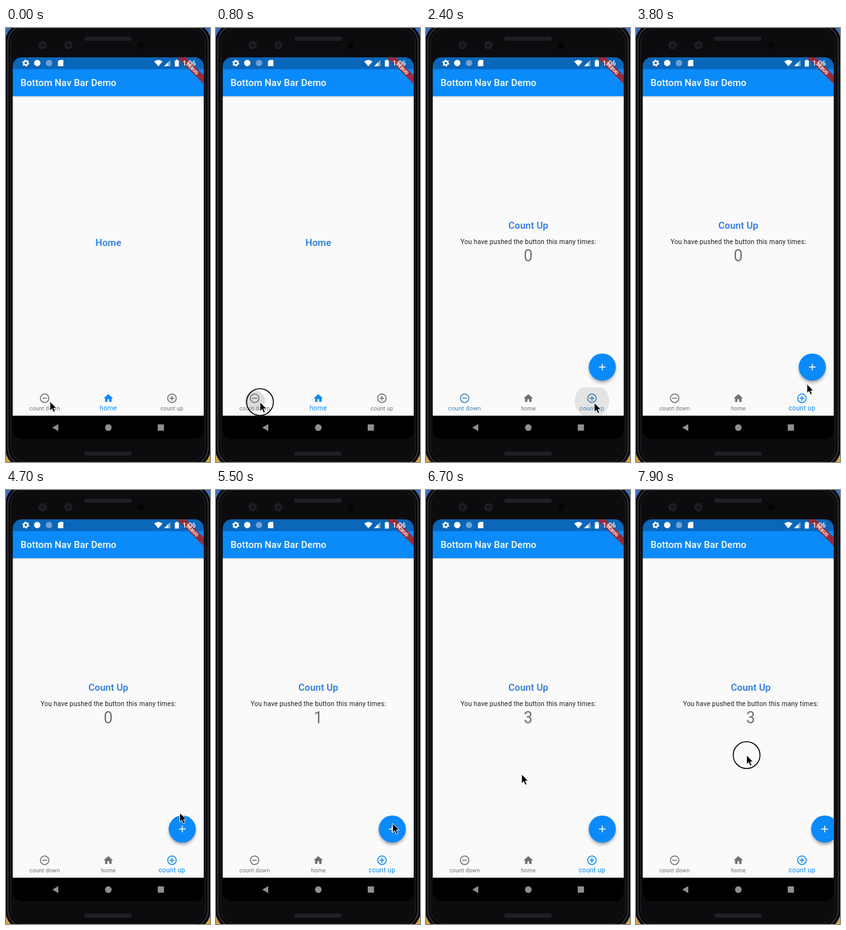
These frames come from a looping animation (320 px wide and 681 px high, 8 s). An HTML page:

```html
<!DOCTYPE html>
<html lang="en">
<head>
<meta charset="utf-8">
<title>Bottom Nav Bar Demo</title>
<style>
  html, body { margin: 0; width: 100%; height: 100%; overflow: hidden; background: #0c0c0f; }
  svg { display: block; width: 100vw; height: 100vh; }
  text { font-family: Roboto, sans-serif; }
  .mid { text-anchor: middle; }
  .head { font-size: 15px; font-weight: 500; letter-spacing: .08px; }
  .blue { fill: #2475e4; }
  .label { font-size: 10.25px; letter-spacing: .23px; }
</style>
</head>
<body>
<svg viewBox="0 0 320 681" preserveAspectRatio="none">
  <defs>
    <linearGradient id="desk" x2="0" y2="1">
      <stop offset="0" stop-color="#3a6ebc"/>
      <stop offset=".5" stop-color="#2b3440"/>
      <stop offset="1" stop-color="#d8a43c"/>
    </linearGradient>
    <linearGradient id="edge" x2="0" y2="1">
      <stop offset="0" stop-color="#000" stop-opacity=".16"/>
      <stop offset="1" stop-color="#000" stop-opacity="0"/>
    </linearGradient>
    <filter id="soft" x="-50%" y="-50%" width="200%" height="200%"><feGaussianBlur stdDeviation="2.6"/></filter>
    <clipPath id="screen"><rect x="10.600" y="46" width="299.600" height="599" rx="14"/></clipPath>
    <clipPath id="view"><rect x="10" y="107" width="301" height="501.400"/></clipPath>
    <clipPath id="bar"><rect x="10" y="564" width="301" height="44.400"/></clipPath>
    <clipPath id="fabClip"><circle cx="276.500" cy="532" r="21.300"/></clipPath>
  </defs>

  <!-- phone -->
  <rect width="320" height="681" fill="url(#desk)"/>
  <rect x="-1" y="-8" width="322" height="698" rx="30" fill="#08080a"/>
  <rect x="3" y="-4" width="314" height="690" rx="27" fill="none" stroke="#44454b" stroke-width="1.300"/>
  <rect x="7" y="0" width="306" height="681" rx="24" fill="#0c0c0f" stroke="#232429"/>
  <g fill="#1f1f25">
    <rect x="123" y="13.500" width="74" height="6.500" rx="2"/>
    <rect x="123" y="664.500" width="74" height="6.500" rx="2"/>
    <circle cx="57.500" cy="27" r="6.500"/>
    <circle cx="98" cy="27" r="6.500"/>
  </g>
  <g fill="#121319">
    <circle cx="57.500" cy="27" r="3"/>
    <circle cx="98" cy="27" r="3"/>
  </g>
  <circle cx="212" cy="27" r="5.500" fill="#050507"/>

  <g clip-path="url(#screen)">
    <rect x="10" y="46" width="301" height="599" fill="#000"/>
    <rect x="10" y="107" width="301" height="501.400" fill="#fafafa"/>
    <rect x="10" y="107" width="301" height="2.500" fill="url(#edge)"/>
    <rect x="10" y="64" width="301" height="43" fill="#0b8afa"/>
    <rect x="10" y="46" width="301" height="18.500" fill="#0a66b8"/>
    <text class="head" x="22.700" y="91.300" fill="#fff">Bottom Nav Bar Demo</text>

    <!-- status bar -->
    <g fill="#fff">
      <circle cx="31" cy="55" r="3.100" fill="none" stroke="#fff" stroke-width="2.400"/>
      <circle cx="31" cy="55" r="4.700" fill="none" stroke="#fff" stroke-width="1.600" stroke-dasharray="2.4 2.52"/>
      <circle cx="49" cy="55" r="5"/>
      <circle cx="67.500" cy="55" r="5" fill="#6ea2d6"/>
      <path d="M84 50H90V60H81.500V52.500z"/>
      <path d="M232.500 52.500Q239 47.500 245.500 52.500L239 60.300z"/>
      <path d="M248 60L258 50V60z" fill-opacity=".45"/>
      <path d="M248 60L254.500 53.500V60z"/>
      <path d="M264.800 51H266.700V49.800H269.300V51H271.200V60.500H264.800z"/>
    </g>
    <g transform="translate(310 46) rotate(45)">
      <rect x="-32" y="20" width="64" height="9.600" fill="#962c38"/>
      <text class="mid" y="27.500" font-size="7.400" font-weight="900" fill="#fff" fill-opacity=".9">DEBUG</text>
    </g>
    <text x="277" y="59" font-size="10.500" font-weight="500" fill="#fff">1:06</text>

    <!-- pages -->
    <g clip-path="url(#view)">
      <text id="home" class="mid head blue" x="160.500" y="342.300">Home</text>
      <g id="counter">
        <text id="title" class="mid head blue" x="160.500" y="315"></text>
        <text class="mid" x="160.500" y="339.300" font-size="10.300" letter-spacing=".18" fill="#202020">You have pushed the button this many times:</text>
        <text id="count" class="mid" x="160.200" y="366" font-size="25" fill="#717171"></text>
        <circle cx="276.500" cy="535.500" r="20.500" fill="#000" fill-opacity=".38" filter="url(#soft)"/>
        <circle cx="276.500" cy="532" r="21.300" fill="#0b8afa"/>
        <g clip-path="url(#fabClip)"><circle id="fabInk" cx="277" cy="525" fill="#fff"/></g>
        <path id="sign" stroke="#fff" stroke-width="1.500"/>
      </g>
    </g>

    <!-- bottom bar -->
    <g clip-path="url(#bar)"><circle id="ink" cy="585" fill="#000"/></g>
    <g id="nav"></g>
    <g fill="#8f8f8f">
      <path d="M82 621.500V632.500L72.500 627z"/>
      <circle cx="160.500" cy="627" r="5.200"/>
      <rect x="238" y="622" width="9.800" height="9.800"/>
    </g>
  </g>

  <g id="cursor">
    <circle id="ring" r="21" fill="none" stroke="#000" stroke-width="1.500"/>
    <path d="M0 0V14.500L3.300 11.400 5.600 16.800 8.200 15.700 5.900 10.500H10.300z" fill="#000" stroke="#fff" stroke-width=".9"/>
  </g>
</svg>

<script>
const $ = id => document.getElementById(id);
const LOOP = 8000, STEP = 100;
const TO_DOWN = 900, TO_UP = 2300;

// time, x, y of the pointer tip
const PATH = [
  [0, 69, 586], [300, 69, 587], [1550, 69, 587], [2050, 264, 588],
  [3050, 264, 588], [3500, 268, 560], [3750, 268, 560], [4300, 273, 499],
  [4450, 273, 499], [4700, 272.500, 506.500], [4950, 277, 523], [6250, 277, 523],
  [6700, 150, 446], [7100, 112, 430], [7300, 101, 424], [7700, 101, 424],
  [7800, 130, 421], [7900, 173.500, 416]
];
// press, release, x
const NAV_TAPS = [[690, TO_DOWN, 61], [2090, TO_UP, 260.300]];
const FAB_TAPS = [[5190, 5310], [5690, 5790], [5990, 6090]];
const DRAG = [7490, LOOP];
const PRESSES = [...NAV_TAPS, ...FAB_TAPS, DRAG];

const clamp = v => Math.max(0, Math.min(1, v));
const ease = v => { v = clamp(v); return v * v * (3 - 2 * v); };
const mix = (a, b, k) => a + (b - a) * k;

const RING = '<circle r="6.700" fill="none" stroke="currentColor" stroke-width="1.500"/>';
const ITEMS = [
  [60.600, 'count down', RING + '<path d="M-3.700 0H3.700" stroke="currentColor" stroke-width="1.500"/>'],
  [160.500, 'home', '<path transform="scale(.73) translate(-12 -12)" fill="currentColor" d="M10 20v-6h4v6h5v-8h3L12 3 2 12h3v8z"/>'],
  [260.300, 'count up', RING + '<path d="M-3.700 0H3.700M0-3.700V3.700" stroke="currentColor" stroke-width="1.500"/>']
];
$('nav').innerHTML = ITEMS.map(([x, name, icon]) =>
  `<g transform="translate(${x} 581)">${icon}<text class="mid label" fill="currentColor">${name}</text></g>`).join('');
const navItems = [...$('nav').children];

function pointer(t) {
  const i = PATH.findIndex(p => p[0] > t);
  if (i < 0) return PATH[PATH.length - 1].slice(1);
  const a = PATH[i - 1], b = PATH[i], k = ease((t - a[0]) / (b[0] - a[0]));
  return [mix(a[1], b[1], k), mix(a[2], b[2], k)];
}

function ripple(el, t, taps, radius, alpha, fade) {
  const tap = taps.find(([on, off]) => t >= on && t < off + fade);
  el.setAttribute('opacity', tap ? alpha * (1 - clamp((t - tap[1]) / fade)) : 0);
  if (!tap) return;
  el.setAttribute('r', radius * mix(.3, 1, ease((t - tap[0]) / 250)));
  if (tap[2]) el.setAttribute('cx', tap[2]);
}

function drawNav(t) {
  const down = ease((t - TO_DOWN) / 200), up = ease((t - TO_UP) / 200);
  [down - up, 1 - down, up].forEach((k, i) => {
    const rgb = [[112, 11], [112, 138], [112, 250]].map(([a, b]) => Math.round(mix(a, b, k)));
    navItems[i].style.color = `rgb(${rgb})`;
    navItems[i].lastChild.setAttribute('transform', `translate(0 19.300) scale(${mix(.857, 1, k)})`);
  });
}

function draw(t) {
  const isHome = t < TO_DOWN, isUp = t >= TO_UP;
  $('home').style.display = isHome ? '' : 'none';
  $('counter').style.display = isHome ? 'none' : '';
  $('title').textContent = isUp ? 'Count Up' : 'Count Down';
  $('count').textContent = FAB_TAPS.filter(tap => t >= tap[1]).length;
  $('sign').setAttribute('d', 'M271.300 532H281.700' + (isUp ? 'M276.500 526.800V537.200' : ''));
  $('counter').setAttribute('transform', `translate(${19.500 * clamp((t - 7800) / 100)} 0)`);

  drawNav(t);
  ripple($('ink'), t, NAV_TAPS, 27, .12, 400);
  ripple($('fabInk'), t, FAB_TAPS, 30, .2, 180);

  const [x, y] = pointer(t);
  $('cursor').setAttribute('transform', `translate(${x} ${y})`);
  $('ring').style.display = PRESSES.some(([on, off]) => t >= on && t < off) ? '' : 'none';
}

function tick(now) {
  draw(Math.floor((now % LOOP) / STEP) * STEP);
  requestAnimationFrame(tick);
}
draw(0);
requestAnimationFrame(tick);
</script>
</body>
</html>
```
